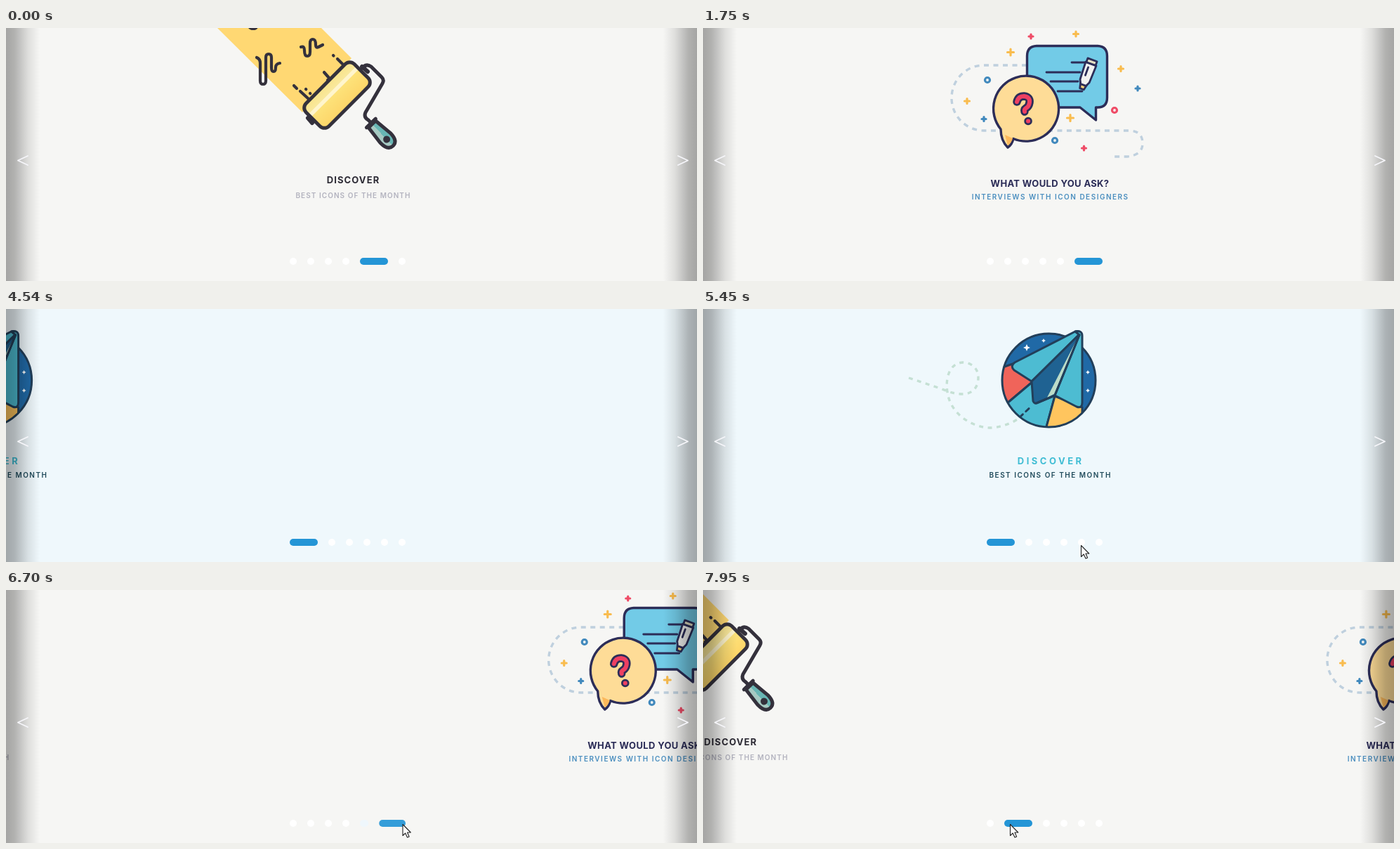
Animation, 984 px wide and 360 px high, one loop 8 s. Source, as an HTML page:

```html
<!DOCTYPE html>
<html lang="en">
<head>
<meta charset="utf-8">
<title>Icon carousel</title>
<style>
  html, body { margin: 0; width: 100%; height: 100%; overflow: hidden; background: #f6f6f4; }
  svg { display: block; width: 984px; height: 360px; }
  path, rect, circle { stroke-linecap: round; stroke-linejoin: round; }
  text { font-family: Inter, "Open Sans", sans-serif; text-anchor: middle; }
  .title { font-size: 13px; font-weight: 700; }
  .sub { font-size: 10px; font-weight: 600; }
  .line { fill: none; }
  .ink { stroke: #34313c; }
  .navy { stroke: #2c2d58; stroke-width: 3.4; }
  .thin { stroke-width: 2.8; }
  .deep { stroke: #223f5a; stroke-width: 3; }
  .trail { fill: none; stroke-width: 3.4; stroke-linecap: butt; }
  .spark { fill: none; stroke-width: 3.2; }
  .gold { stroke: #f9bc4e; }
  .red { stroke: #ef4b66; }
  .blue { stroke: #4189bd; }
</style>
</head>
<body>
<svg viewBox="0 0 984 360">
  <defs>
    <linearGradient id="shade">
      <stop offset="0" stop-opacity=".33"/>
      <stop offset=".25" stop-opacity=".28"/>
      <stop offset=".65" stop-opacity=".1"/>
      <stop offset="1" stop-opacity="0"/>
    </linearGradient>
    <linearGradient id="paint" x2="0" y2="1">
      <stop offset="0" stop-color="#f9e48a"/>
      <stop offset=".28" stop-color="#f9e89c"/>
      <stop offset=".3" stop-color="#fff5cc"/>
      <stop offset=".4" stop-color="#fff5cc"/>
      <stop offset=".42" stop-color="#fde27a"/>
      <stop offset="1" stop-color="#fdd568"/>
    </linearGradient>
    <linearGradient id="grip" x2="0" y2="1">
      <stop offset=".5" stop-color="#68b6b4"/>
      <stop offset=".5" stop-color="#a6c9c2"/>
    </linearGradient>
    <clipPath id="porthole"><circle cx="492.5" cy="101.5" r="67"/></clipPath>
    <path id="mark" d="M447 105Q449 97 457 97Q466 98 465 106Q464 112 460 114Q457 116 458 119M463 132.5h.1"/>
  </defs>

  <g id="track">
    <rect x="-990" width="4950" height="360" fill="#eff8fc"/>
    <rect x="3960" width="2970" height="360" fill="#f6f6f4"/>

    <!-- paper plane -->
    <g>
      <path class="trail" stroke="#c5e0d4" stroke-dasharray="6 6.5" d="M293 98L338 113Q382 132 391 106C396 84 381 76 370 76C350 77 345 100 348 118C352 150 385 170 412 169Q438 166 456 151"/>
      <g clip-path="url(#porthole)">
        <rect x="424" y="33" width="138" height="138" fill="#2069a6"/>
        <path class="deep" fill="#f0645a" d="M415 87L441 78L470 103L432 135L415 130Z"/>
        <path class="deep" fill="#4dbcd2" d="M432 135L470 103L501 124L487 175H430Z"/>
        <path class="deep" fill="#ffc55e" d="M501 124L540 140V175H487Z"/>
        <path class="line deep" stroke-dasharray="6 6" d="M451 154L468 138"/>
        <path fill="#fff" d="M461 50l1.5 3.5 3.5 1.5-3.5 1.5-1.5 3.5-1.5-3.5-3.5-1.5 3.5-1.5zM485 42l1 2 2 1-2 1-1 2-1-2-2-1 2-1zM548 87l1 2 2 1-2 1-1 2-1-2-2-1 2-1zM548 113l1 2 2 1-2 1-1 2-1-2-2-1 2-1z"/>
      </g>
      <circle class="line deep" cx="492.5" cy="101.5" r="66.5"/>
      <path class="deep" fill="#4dbcd2" d="M530 32L444 76Q437 81 443 87L468 103L537 35Q534 30 530 32Z"/>
      <path class="deep" fill="#1f6292" d="M536 36L468 103L470 131Q472 136 477 133L501 123Z"/>
      <path class="deep" fill="#4dbcd2" d="M530 32Q540 30 540 38V133Q540 142 532 139L501 123L536 37Z"/>
      <path fill="#bcdcc8" d="M532 44L490 126L500 121Z"/>
      <path class="line deep" d="M536 37L501 123L475 134"/>
      <text class="title" x="495.2" y="221" letter-spacing="3.5" fill="#40bdd4">DISCOVER</text>
      <text class="sub" x="494.7" y="240" letter-spacing="1.5" fill="#1f4a5a">BEST ICONS OF THE MONTH</text>
    </g>

    <!-- paint roller -->
    <g transform="translate(3960)">
      <path fill="#ffd873" d="M301 0H449L492 43L422 120Z"/>
      <g class="line ink" stroke-width="4.2">
        <path d="M357 42Q362 44 362 50V75Q362 80 366 80T370 75V42Q370 37 374 37T378 42V56Q378 62 381 62T384 56Q384 51 390 50"/>
        <path d="M420 27Q425 25 425 32Q425 40 429 40T433 34V22Q433 16 437 16T441 24Q441 29 445 27L451 24"/>
        <path d="M346-3Q347 1 352 1T357-3"/>
        <path d="M466 39l.5.5M472 44l7 7M453 63l7 8M458 74l.5.5M410 82l4 4M419 90l12 11M427 87l.3.3M433 93l.3.3"/>
        <path stroke-width="5" d="M507 57Q513 50 520 55L535 70Q539 74 536 79L512 120Q509 127 516 131L520 135"/>
        <path stroke-width="6" d="M430 128L436 135M507 55L515 62"/>
      </g>
      <rect class="ink" stroke-width="5" fill="url(#paint)" x="-48.5" y="-23" width="97" height="46" rx="9" transform="translate(471.5 95.5) rotate(-45)"/>
      <g class="ink" stroke-width="5" transform="translate(534.5 150.5) rotate(46)">
        <path fill="url(#grip)" d="M-19-7L8-10Q24-10 24 0T8 10L-19 7Z"/>
        <path d="M-21-9V9"/>
        <circle cx="11" r="2.5" fill="#34313c"/>
      </g>
      <text class="title" x="494.5" y="221" letter-spacing="1.1" fill="#2c2a34">DISCOVER</text>
      <text class="sub" x="494.5" y="241.5" letter-spacing="1.05" fill="#b2b2be">BEST ICONS OF THE MONTH</text>
    </g>

    <!-- speech bubbles -->
    <g transform="translate(4950)">
      <path class="trail" stroke="#bfd0de" stroke-dasharray="7 6.5" d="M461 53H400A46 46.5 0 0 0 400 146H608Q626 147 626 164T604 183H580"/>
      <path class="navy" fill="#72cbe7" d="M475 25.5H562Q575.5 26 575.5 40V99Q575.5 113 562 113H559.5V131L537 113H475Q461.5 113 461.5 99V40Q461.5 26 475 25.5Z"/>
      <path class="line navy thin" d="M525 49H545M489 63H537M495 76H534M505 90H540"/>
      <g class="navy thin" transform="translate(547 66) rotate(20)">
        <path fill="#f8d27a" d="M-5 13H5L3 22H-3Z"/>
        <path fill="#f2f2f0" d="M-8-16H8L7 10L4 16H-4L-7 10Z"/>
        <path fill="#e6e0c4" d="M-7-22H7V-16H-7Z"/>
        <path d="M-2-10V2"/>
      </g>
      <path class="navy" fill="#fedc97" d="M442 157.5A46.5 46.5 0 1 0 424 144Q424 160 434 170Q440 166 442 157.5Z"/>
      <path fill="#fcb85a" d="M430 152L441 157Q439 164 434 167Z"/>
      <g class="line">
        <use href="#mark" stroke="#2c2d58" stroke-width="11.5"/>
        <use href="#mark" stroke="#ee3f62" stroke-width="6"/>
      </g>
      <path class="spark gold" d="M438 30v9m-4.5-4.5h9M531 5v7m-3.5-3.5h7M595 54.5v7m-3.5-3.5h7M376 100.5v7m-3.5-3.5h7M523 123.5v9m-4.5-4.5h9"/>
      <path class="spark red" d="M467 9v6m-3-3h6M542.5 168v6m-3-3h6"/>
      <path class="spark blue" d="M619 83v6m-3-3h6M400 126.5v6m-3-3h6"/>
      <circle class="spark blue" cx="405" cy="74" r="3.5"/>
      <circle class="spark blue" cx="501" cy="160" r="3.5"/>
      <circle class="spark red" cx="586" cy="117" r="3.5"/>
      <text class="title" x="494" y="226" letter-spacing=".35" fill="#2a2b56">WHAT WOULD YOU ASK?</text>
      <text class="sub" x="494.7" y="244" letter-spacing="1.5" fill="#4a8ebf">INTERVIEWS WITH ICON DESIGNERS</text>
    </g>
  </g>

  <rect width="48" height="360" fill="url(#shade)"/>
  <rect width="48" height="360" fill="url(#shade)" transform="translate(984) scale(-1 1)"/>
  <path class="line" stroke="#f6f6fa" stroke-width="1.8" d="M31 182L17 188.5L31 195M957 182L971 188.5L957 195"/>
  <g id="dots"></g>
  <path id="cursor" fill="#fff" stroke="#222" stroke-width="1.1" d="M.5.5V16.5L4.2 13L7 19L9.6 18L7 12H11.8Z"/>
</svg>

<script>
  const LOOP = 8000, LAST = 7951, PITCH = 990;
  const SLIDE_MS = 500, DOT_MS = 250;
  const FIRST = 4;

  // [slide start, dot start, target]
  const moves = [
    [1234, 1234, 5], [4234, 4234, 0], [5667, 5667, 4],
    [6534, 6534, 5], [7889, 7680, 1]
  ];
  // [start, end, x, y]
  const cursorPath = [
    [5130, 5430, 538, 336], [6150, 6400, 564.5, 333], [6950, 7370, 437, 333]
  ];
  const CURSOR_FROM = [620, 362];

  const track = document.getElementById('track');
  const cursor = document.getElementById('cursor');
  const dots = Array.from({ length: 6 }, () => {
    const dot = document.createElementNS('http://www.w3.org/2000/svg', 'rect');
    for (const [key, value] of Object.entries({ y: 327, height: 10, rx: 5 })) dot.setAttribute(key, value);
    return document.getElementById('dots').appendChild(dot);
  });

  const mix = (a, b, k) => a + (b - a) * k;
  const bezier = (s, a, b) => 3 * (1 - s) * s * ((1 - s) * a + s * b) + s ** 3;

  // CSS "ease": cubic-bezier(.25, .1, .25, 1), solved by bisection
  function ease(t, start, ms) {
    const x = (t - start) / ms;
    if (x <= 0) return 0;
    if (x >= 1) return 1;
    let s = 0.5;
    for (let step = 0.25; step > 1e-6; step /= 2) {
      s += bezier(s, 0.25, 0.25) < x ? step : -step;
    }
    return bezier(s, 0.1, 1);
  }

  function drawDots(t) {
    let x = 404;
    dots.forEach((dot, i) => {
      const p = moves.reduce((v, [, start, to]) =>
        mix(v, +(i === to), ease(t, start, DOT_MS)), +(i === FIRST));
      const width = 10 + 30 * p;
      dot.setAttribute('x', x);
      dot.setAttribute('width', width);
      dot.setAttribute('fill', `rgb(${[36, 149, 214].map(c => Math.round(mix(255, c, p)))})`);
      x += width + 15;
    });
  }

  function draw(t) {
    const pos = moves.reduce((v, [start, , to]) => mix(v, to, ease(t, start, SLIDE_MS)), FIRST);
    track.setAttribute('transform', `translate(${-pos * PITCH})`);
    drawDots(t);

    const [x, y] = cursorPath.reduce(([cx, cy], [start, end, tx, ty]) => {
      const k = ease(t, start, end - start);
      return [mix(cx, tx, k), mix(cy, ty, k)];
    }, CURSOR_FROM);
    cursor.setAttribute('transform', `translate(${x} ${y})`);
  }

  const origin = performance.now();
  function tick() {
    draw(Math.min(LAST, (performance.now() - origin) % LOOP));
    requestAnimationFrame(tick);
  }
  tick();
</script>
</body>
</html>
```
